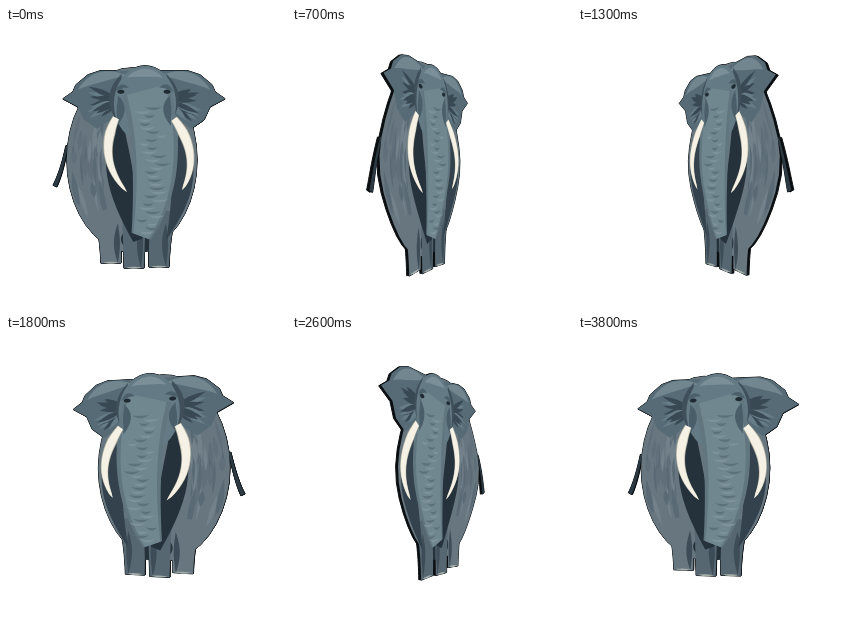
An HTML page with a canvas that plays this animation: 280 px wide and 280 px high, repeating every 3900 ms.

```html
<!DOCTYPE html>
<html lang="en">
<head>
<meta charset="utf-8">
<title>Turning elephant</title>
<style>
html, body { margin: 0; width: 100%; height: 100%; overflow: hidden; background: #fff; }
canvas { display: block; width: 280px; height: 280px; }
</style>
</head>
<body>
<canvas id="stage" width="280" height="280"></canvas>
<script>
const ctx = document.getElementById('stage').getContext('2d');
const LOOP = 3900, STEP = 100, AXIS = 141, MID = 145, DEPTH = 430, THICK = 1.3;
const HEAD_X = 138;
const BODY = { x: 126, y: 132, rx: 65, ry: 92 };

let seed = 7;
const random = (low, high) => {
  seed = seed * 16807 % 2147483647;
  return low + (high - low) * seed / 2147483647;
};

function ellipse(x, y, rx, ry) {
  return Array.from({ length: 40 }, (_, i) => {
    const a = i / 20 * Math.PI;
    return [x + rx * Math.cos(a), y + ry * Math.sin(a)];
  });
}

// A ribbon along the quadratic curve a-b-c; half(t) is half its width.
function ribbon(a, b, c, half) {
  const left = [], right = [];
  for (let t = 0; t <= 1; t += 1 / 16) {
    const at = k => (1 - t) ** 2 * a[k] + 2 * t * (1 - t) * b[k] + t * t * c[k];
    const slope = k => (1 - t) * (b[k] - a[k]) + t * (c[k] - b[k]);
    const w = half(t) / Math.hypot(slope(0), slope(1));
    left.push([at(0) - w * slope(1), at(1) + w * slope(0)]);
    right.unshift([at(0) + w * slope(1), at(1) - w * slope(0)]);
  }
  return left.concat(right);
}

const spindle = w => t => w * Math.sin(Math.PI * t);
const steady = w => () => w;
// Horizontal offsets from the middle of the head, for either side.
const mirror = (side, pts) => pts.map(([x, y]) => [HEAD_X + side * x, y]);
// A point on the flank: f = -1 is the left edge, 1 the right edge.
const flank = (f, y) => [BODY.x + f * BODY.rx * Math.sqrt(1 - ((y - BODY.y) / BODY.ry) ** 2), y];

const parts = [];
const paint = (fill, pts, solid = false) => parts.push({ fill, pts, solid });

function streak(fill, low, high) {
  const f = random(low, high), y = random(85, 160), end = y + random(15, 45);
  paint(fill, ribbon(flank(f, y), flank(f, (y + end) / 2), flank(f, end), spindle(random(1, 3))));
}

function ear(side) {
  const rim = [[14, 43], [44, 43], [56, 47], [68, 57], [71, 64], [81, 71], [66, 79], [60, 92], [47, 101], [30, 90]];
  paint('#566b76', mirror(side, rim), true);
  paint('#71868f', ribbon(...mirror(side, [[16, 48], [46, 44], [66, 62]]), spindle(5)));
  for (let i = 0; i < 16; i++) {
    const a = random(-0.5, 0.85), r = random(22, 37);
    const ray = d => [24 + d * Math.cos(a), 72 + d * Math.sin(a)];
    paint(i % 4 ? '#394954' : '#667c87', ribbon(...mirror(side, [ray(2), ray(r / 2), ray(r)]), spindle(2.5)));
  }
  paint('#3f505b', ribbon(...mirror(side, [[22, 46], [34, 68], [28, 92]]), spindle(5)));
}

function tusk(root, bend, tip) {
  const taper = w => t => w * Math.min(1, 0.6 + 2 * t) * Math.sqrt(1 - t);
  paint('#b5b4a6', ribbon(root, bend, tip, taper(6)));
  paint('#f5f1e5', ribbon(root, bend, tip, taper(5)));
}

function buildElephant() {
  paint('#2c3a43', ribbon([61, 118], [56, 144], [49, 158], t => 1 + t), true);
  paint('#67767f', ellipse(BODY.x, BODY.y, BODY.rx, BODY.ry), true);
  for (let i = 0; i < 34; i++) streak(['#5a6a75', '#72818a', '#606f7a'][i % 3], -0.95, -0.45);
  for (let i = 0; i < 8; i++) streak('#4b5c67', 0.6, 0.92);

  paint('#26323a', ellipse(137, 211, 22, 13));
  [[105, 235], [128, 240], [153, 239]].forEach(([x, y], i) => {
    const top = [x + (i - 1) * 6, 182];
    paint(i ? '#566771' : '#67767f', ribbon(top, [x, 205], [x, y], t => 12 - 2 * t), true);
    paint('#3d4c56', ribbon([x + 7, 195], [x + 5, 215], [x + 7, y], spindle(3)));
    paint('#a3aca9', ribbon([x - 8, y - 1], [x, y], [x + 8, y - 1], spindle(1)));
  });

  paint('#26323b', ribbon([113, 95], [106, 140], [132, 212], t => 5 + 8 * Math.sin(Math.PI * t)));
  paint('#33424c', ribbon([172, 98], [188, 145], [160, 212], spindle(10)));
  ear(-1);
  ear(1);

  paint('#647a85', ellipse(139, 76, 31, 38), true);
  const trunk = [[140, 62], [160, 140], [135, 208]];
  const trunkWidth = t => 24 - 14 * t ** 3;
  paint('#61767f', ribbon(...trunk, trunkWidth));
  paint('#71878f', ribbon(...trunk, t => trunkWidth(t) * 0.82));
  // folds across the trunk
  for (let y = 80; y < 205; y += 4) {
    const x = 148 - ((y - 135) / 22) ** 2 + random(-9, 9);
    const w = random(5, 9);
    paint(y % 8 ? '#7d929a' : '#5c717c', ribbon([x - w, y - 1], [x, y + 3], [x + w, y - 1], spindle(1.2)));
  }

  paint('#7a8f98', ribbon([121, 50], [139, 40], [157, 50], spindle(4)));
  for (const side of [-1, 1]) {
    paint('#4c606c', ribbon(...mirror(side, [[15, 60], [23, 56], [29, 64]]), spindle(2)));
    paint('#1f2b33', ellipse(HEAD_X + side * 23, 64, 3.5, 2));
    paint('#4a5e69', ribbon(...mirror(side, [[26, 68], [20, 80], [27, 98]]), spindle(4)));
  }
  tusk([110, 90], [90, 130], [121, 164]);
  tusk([168, 91], [196, 128], [176, 162]);
}

let cos = 1, sin = 0;

// Turn about the vertical axis, with perspective and a swell toward the side view.
function project([x, y], h) {
  const X = x - AXIS, z = h * cos - X * sin;
  const near = DEPTH / (DEPTH - z);
  const belly = 1 + 0.2 * sin * sin * Math.exp(-(((y - 138) / 42) ** 2));
  const swell = (1 + 0.18 * sin * sin) * belly;
  return [AXIS + (X * cos * swell + h * sin) * near,
          MID + (y - MID) * near * (1 + 0.1 * (z / 72) ** 2)];
}

function trace(pts, h) {
  ctx.beginPath();
  pts.forEach(p => ctx.lineTo(...project(p, h)));
  ctx.closePath();
}

function draw(time) {
  const angle = Math.floor(time % LOOP / STEP) * STEP / LOOP * 2 * Math.PI;
  cos = Math.cos(angle);
  sin = Math.sin(angle);
  const front = cos < 0 ? -THICK : THICK;
  ctx.fillStyle = '#fff';
  ctx.fillRect(0, 0, 280, 280);

  ctx.fillStyle = ctx.strokeStyle = '#0b0f12';
  for (const h of [-front, 0, front]) {
    for (const { pts } of parts.filter(p => p.solid)) {
      trace(pts, h);
      ctx.fill();
      ctx.stroke();
    }
  }
  for (const { fill, pts } of parts) {
    ctx.fillStyle = fill;
    trace(pts, front);
    ctx.fill();
  }
}

function tick() {
  draw(performance.now());
  requestAnimationFrame(tick);
}
buildElephant();
tick();
</script>
</body>
</html>
```
